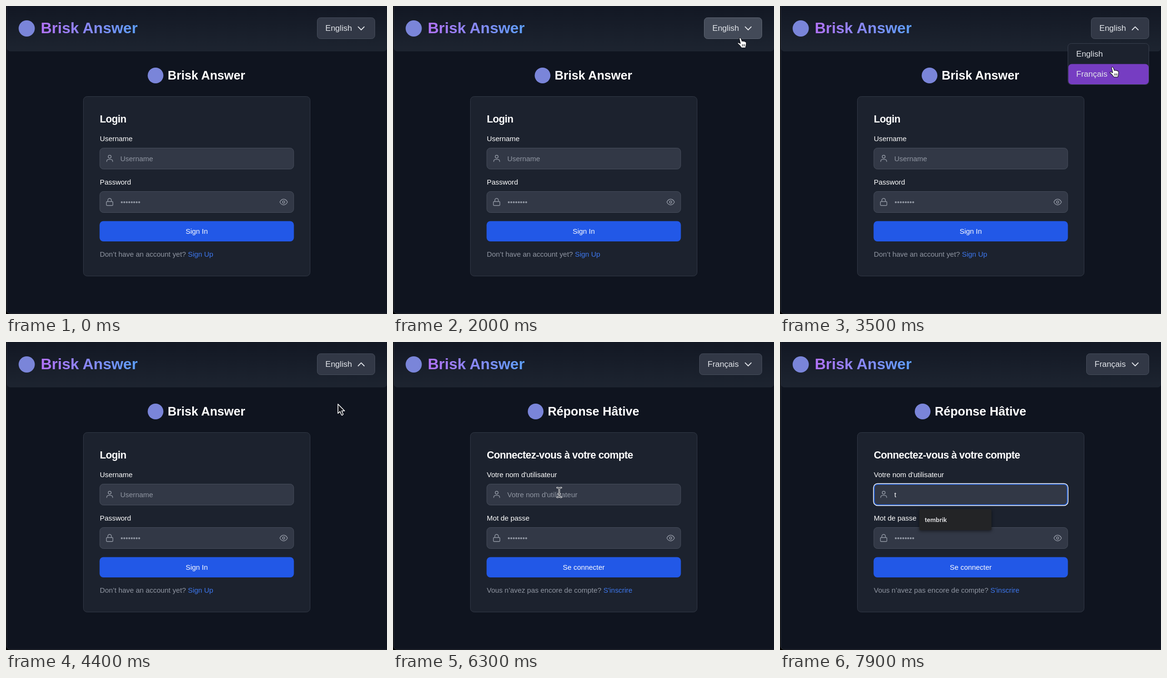
Recreate the animation shown at these times as an HTML page. Size 800 px wide and 645 px high, loop 8000 ms.

```html
<!DOCTYPE html>
<html lang="en">
<head>
<meta charset="utf-8">
<title>Login</title>
<style>
  html, body { margin: 0; width: 100%; height: 100%; overflow: hidden; background: #000; }
  svg { display: block; width: 800px; height: 645px; font: 14.93px "Liberation Sans", Arial, sans-serif; }
  .box { fill: #323846; stroke: #474e5c; }
  .line { fill: none; stroke: #9298a4; stroke-width: 1.4; stroke-linecap: round; stroke-linejoin: round; }
  .muted { fill: #9096a2; }
  .white { fill: #fff; }
  .logo { fill: #7a85d9; }
  .lang { font-size: 17.07px; fill: #e3e6eb; }
  .ui { font: 600 12.6px Inter, sans-serif; fill: #e6e6e8; }
  .panel { fill: #232426; filter: drop-shadow(0 2px 3px #0008); }
  .hover .box { fill: #434a58; stroke: #606774; }
</style>
</head>
<body>
<svg viewBox="0 0 800 645">
  <defs>
    <linearGradient id="head" x2="0" y2="1">
      <stop stop-color="#111622"/><stop offset="1" stop-color="#1d2430"/>
    </linearGradient>
    <linearGradient id="brand" gradientUnits="userSpaceOnUse" x1="74" x2="278">
      <stop stop-color="#b072f6"/><stop offset="1" stop-color="#5c9ef8"/>
    </linearGradient>
    <g id="globe">
      <circle r="6.8" fill="#a0a1a4"/>
      <path d="M-5-1l3 2 1 4-2 1q-4-3-2-7zM0-6l4 1 1 3-3 1-1 3-3-2 1-2-2-1zM3 2l3-1-2 4-2 0z" fill="#232426"/>
    </g>
  </defs>

  <rect x="1.5" y="-20" width="820" height="664" rx="7" fill="#0f141f" stroke="#30343d"/>
  <rect x="2" y="-10" width="798" height="105" rx="7" fill="url(#head)"/>
  <circle class="logo" cx="43.5" cy="47" r="17"/>
  <text x="73" y="57" font-size="32" font-weight="700" fill="url(#brand)">Brisk Answer</text>

  <g id="button">
    <rect id="buttonBox" class="box" y="24.5" height="44" rx="7"/>
    <text id="buttonText" class="lang" y="52"></text>
    <path id="chevron" class="line" style="stroke:#e3e6eb;stroke-width:1.8"/>
  </g>

  <circle id="mark" class="logo" cy="145.5" r="16.5"/>
  <text id="name" class="white" y="154" font-size="25.6" font-weight="700"></text>

  <rect x="162.5" y="189.5" width="476" height="376" rx="8" fill="#1c222e" stroke="#323946"/>
  <text id="title" class="white" x="197" y="244" font-size="21.33" font-weight="700" letter-spacing="-.533"></text>
  <text id="userLabel" class="white" x="197" y="283"></text>
  <rect class="box" x="197" y="297.5" width="407" height="44" rx="7.5"/>
  <g id="ring" fill="none">
    <rect x="198" y="298" width="405" height="43" rx="7" stroke="#2159c8" stroke-width="2"/>
    <rect x="196.3" y="296.5" width="408.6" height="46" rx="8.5" stroke="#fff" stroke-width="1.4"/>
  </g>
  <g class="line">
    <circle cx="217.7" cy="315.6" r="3.1"/>
    <path d="M211.5 325.8v-.8a3.8 3.8 0 0 1 3.8-3.6h4.8a3.8 3.8 0 0 1 3.8 3.6v.8"/>
    <rect x="210.8" y="409.5" width="13.6" height="8.3" rx="1.6"/>
    <path d="M213.8 409.3v-2.5a3.8 3.8 0 0 1 7.6 0v2.5"/>
    <path d="M575 410.5q3.2-6 8-6t8 6q-3.2 6-8 6t-8-6z"/>
    <circle cx="583" cy="410.5" r="2.4"/>
  </g>
  <text id="field" x="240" y="324.7"></text>
  <path id="caret" d="M240.5 311v17" stroke="#fff"/>
  <text id="passLabel" class="white" x="197" y="374"></text>
  <rect class="box" x="197" y="388.5" width="407" height="44" rx="7.5" style="fill-opacity:.999"/>
  <g class="line">
    <rect x="210.8" y="409.5" width="13.6" height="8.3" rx="1.6"/>
    <path d="M213.8 409.3v-2.5a3.8 3.8 0 0 1 7.6 0v2.5"/>
    <path d="M575 410.5q3.2-6 8-6t8 6q-3.2 6-8 6t-8-6z"/>
    <circle cx="583" cy="410.5" r="2.4"/>
  </g>
  <text class="muted" x="240.5" y="415.8">••••••••</text>
  <rect x="196.5" y="450.5" width="408" height="42.5" rx="8" fill="#2258e7"/>
  <text id="submit" class="white" x="400.5" y="476.5" text-anchor="middle"></text>
  <text class="muted" x="197" y="525"><tspan id="ask"></tspan> <tspan id="link" fill="#3d77ee"></tspan></text>

  <g id="menu">
    <rect x="604.5" y="78.5" width="170" height="86" rx="7" fill="#1c222e" stroke="#383f4d"/>
    <rect id="pick" x="605.5" width="168.5" height="42.5" rx="7" fill="#763dc2"/>
    <text class="lang" x="622" y="105.7">English</text>
    <text class="lang" x="622" y="148.3">Français</text>
  </g>

  <g id="saved" class="ui">
    <rect class="panel" x="292.5" y="350" width="210.5" height="153" rx="2"/>
    <use href="#globe" x="314" y="380"/>
    <use href="#globe" x="314" y="430"/>
    <text x="335" y="374">davlora528</text>
    <text x="335" y="424">xuv</text>
    <g fill="none" stroke="#b4b5b8" stroke-width="2" stroke-linecap="round" stroke-dasharray="0 6.1">
      <path d="M338 391.5h73.5M338 441.5h61.5"/>
    </g>
    <path d="M292.5 459.5h210.5" stroke="#3b3c3f"/>
    <circle cx="314.5" cy="481.5" r="6.5" fill="#a2a3a5"/>
    <text x="335" y="486" fill="#98999d">Manage Passwords…</text>
    <g fill="none" stroke="#a5a6a9" stroke-width="2.4">
      <circle cx="477.3" cy="481" r="3.4"/>
      <path d="M481 481h9M487.5 481v4"/>
    </g>
  </g>
  <g id="hint" class="ui">
    <rect class="panel" x="292.5" y="350" width="151.5" height="44" rx="2"/>
    <text x="304" y="376.5">tembrik</text>
  </g>

  <g id="cursor" stroke-linejoin="round">
    <path id="arrow" d="M0 0V19.5L4.3 15.6 7.5 22.8Q9.5 24 11 21.2L8 14.2H14Z" fill="#10131a" stroke="#fff" stroke-width="1.5"/>
    <g id="hand">
      <path d="M-2 1Q-.5-2 1.7 1L4 7Q6 5.5 7.2 7.3 9.2 6 10.2 8 12.6 7.5 12.8 10.5L12.5 15 11.2 20.5H3L-1-15.5-5.5 11.5Q-5.5 8.5-2 10.5L.5 11.5Z" fill="none"/>
      <path d="M-2 1Q-.5-2 1.7 1L4 7Q6 5.5 7.2 7.3 9.2 6 10.2 8 12.6 7.5 12.8 10.5L12.5 15 11.2 20.5H3L-1 15.5-5.5 11.5Q-5.5 8.5-2 10.5L.5 11.5Z" fill="#fff" stroke="#11141b" stroke-width="1.1"/>
      <path d="M4.5 13v4.5M7 13v4.5M9.5 13v4.5" stroke="#11141b"/>
    </g>
    <g id="beam" fill="none" stroke-linecap="round">
      <path id="beamPath" d="M-4.5-10Q-1-10 0-8 1-10 4.5-10M0-8V8M-4.5 10Q-1 10 0 8 1 10 4.5 10M-2 3H2" stroke="#fff" stroke-width="3"/>
      <path d="M-4.5-10Q-1-10 0-8 1-10 4.5-10M0-8V8M-4.5 10Q-1 10 0 8 1 10 4.5 10M-2 3H2" stroke="#20242d" stroke-width="1.1"/>
    </g>
  </g>
</svg>
<script>
const LOOP = 8000, STEP = 100;
const T = { enter: 1000, open: 2400, close: 4100, french: 5000, focus: 6500, type: 7400 };
const route = [[1000, 610, 655], [1700, 729, 67], [2800, 729, 67], [3100, 708, 113],
               [3600, 697, 130], [5600, 697, 130], [6300, 349, 315], [8000, 349, 315]];

const english = {
  buttonText: 'English', name: 'Brisk Answer', title: 'Login', userLabel: 'Username',
  passLabel: 'Password', submit: 'Sign In', ask: 'Don’t have an account yet?', link: 'Sign Up',
  left: 653, mark: 314
};
const french = {
  buttonText: 'Français', name: 'Réponse Hâtive', title: 'Connectez-vous à votre compte',
  userLabel: "Votre nom d'utilisateur", passLabel: 'Mot de passe', submit: 'Se connecter',
  ask: 'Vous n’avez pas encore de compte?', link: "S'inscrire", left: 643, mark: 299.5
};
const labels = ['buttonText', 'name', 'title', 'userLabel', 'passLabel', 'submit', 'ask', 'link'];

const $ = id => document.getElementById(id);
const set = (id, attrs) => { for (const k in attrs) $(id).setAttribute(k, attrs[k]); };
const show = (id, on) => { $(id).style.display = on ? '' : 'none'; };
const within = (v, a, b) => v >= a && v < b;

function pointer(t) {
  const i = Math.max(1, route.findIndex(p => p[0] > t));
  const [t0, x0, y0] = route[i - 1], [t1, x1, y1] = route[i];
  const u = Math.min(1, Math.max(0, (t - t0) / (t1 - t0)));
  const e = u * u * (3 - 2 * u);
  return [x0 + (x1 - x0) * e, y0 + (y1 - y0) * e];
}

function draw(t) {
  const lang = t < T.french ? english : french;
  const [x, y] = pointer(t);
  const open = within(t, T.open, T.close), typed = t >= T.type;
  const onButton = x > lang.left && within(y, 24, 69);
  const onMenu = open && x > 604 && within(y, 78, 165);
  const onField = within(x, 197, 604) && within(y, 297, 342);

  for (const id of labels) $(id).textContent = lang[id];
  set('buttonBox', { x: lang.left + .5, width: 774 - lang.left });
  set('buttonText', { x: lang.left + 17.5 });
  set('chevron', { d: within(t, T.open, T.french) ? 'M739.5 50l6.3-6.3 6.3 6.3' : 'M739.5 43.7l6.3 6.3 6.3-6.3' });
  set('button', { class: onButton ? 'hover' : '' });
  set('mark', { cx: lang.mark });
  set('name', { x: lang.mark + 25.5 });

  show('menu', open);
  set('pick', { y: y >= 121 ? 121.5 : 79 });

  $('field').textContent = typed ? 't' : lang.userLabel;
  set('field', { class: typed ? 'white' : 'muted' });
  show('ring', t >= T.focus);
  const blink = t - (typed ? T.type : T.focus);
  show('caret', blink >= 0 && blink % 1000 < 500);
  set('caret', { transform: `translate(${typed ? 4.5 : 0})` });
  show('saved', within(t, T.focus, T.type));
  show('hint', typed);

  show('cursor', within(t, T.enter, T.type));
  set('cursor', { transform: `translate(${x} ${y})` });
  const hand = onButton || onMenu;
  show('hand', hand);
  show('beam', onField);
  show('arrow', !hand && !onField);
}

const start = performance.now();
function tick() {
  const t = (performance.now() - start) % LOOP;
  draw(Math.floor(t / STEP) * STEP);
  requestAnimationFrame(tick);
}
tick();
</script>
</body>
</html>
```
